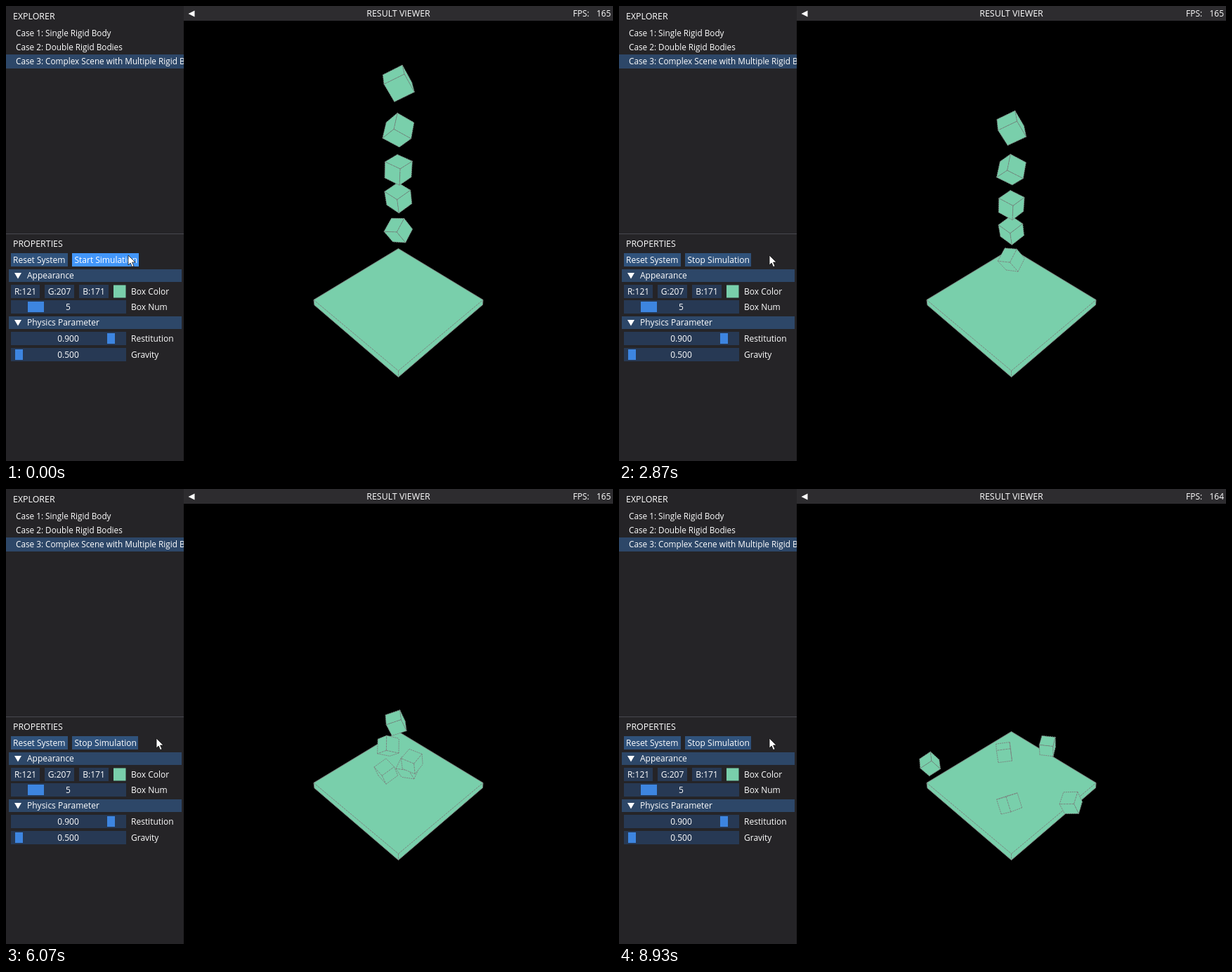
Recreate the animation shown at these times as an HTML page with a canvas. Size 864 px wide and 648 px high, loop 9000 ms.

```html
<!DOCTYPE html>
<html lang="en">
<head>
<meta charset="utf-8">
<title>Rigid body viewer</title>
<style>
  html, body { margin: 0; width: 100%; height: 100%; overflow: hidden; background: #000; }
  canvas { display: block; }
</style>
</head>
<body>
<canvas id="stage" width="864" height="648"></canvas>
<script>
const ctx = document.getElementById('stage').getContext('2d');
const GREEN = '#79cfab', EDGE = '#7b8681', HEADER = '#2d4768', BUTTON = '#30527b', HOVER = '#4296fa';
const FRAME = '#273954', GRAB = '#3d85e0', PANEL = '#252427', BAR = '#2d2c2f';

// Seconds: release, first collisions, a moment of the scatter, end of the motion.
const START = 0.1, HIT = 4.87, SCATTER = 6.07, END = 8.93, LOOP = 9;
// Pixels: camera distance, cube side at floor scale, axis of the falling stack.
const CAMERA = 568, SIDE = 20.7, AXIS_X = 558.5, FLOOR_Y = 419;
const GRAVITY = 4.49, FORESHORTEN = 0.0013;

const clamp = (v, a = 0, b = 1) => Math.min(b, Math.max(a, v));
const lerp = (a, b, u) => a + (b - a) * u;
const smooth = u => u * u * (3 - 2 * u);
const dot = (a, b) => a[0] * b[0] + a[1] * b[1] + a[2] * b[2];
const unit = a => a.map(v => v / Math.sqrt(dot(a, a)));
const cross = (a, b) => [0, 1, 2].map(i => a[(i + 1) % 3] * b[(i + 2) % 3] - a[(i + 2) % 3] * b[(i + 1) % 3]);
const transpose = m => [0, 1, 2].map(i => m.map(row => row[i]));

// Orthonormal frame from two rough directions; both share the correction.
function frame(a, b) {
  for (let i = 0; i < 3; i++) {
    a = unit(a);
    b = unit(b);
    const d = dot(a, b) / 2;
    [a, b] = [a.map((v, j) => v - d * b[j]), b.map((v, j) => v - d * a[j])];
  }
  a = unit(a);
  b = unit(b);
  return [a, b, cross(a, b)];
}

// Orientation from two screen edges at the nearest corner of a cube.
function fromEdges([ax, ay, bx, by], size) {
  const deepen = (x, y) => [x, y, Math.sqrt(Math.max(0, size * size - x * x - y * y))];
  return transpose(frame(deepen(ax, ay), deepen(bx, by)));
}

// The equivalent cube orientation that needs the least turning.
function nearest(prev, rot) {
  let best = rot, score = -9;
  for (let i = 0; i < 3; i++) {
    for (let bits = 0; bits < 8; bits++) {
      const cols = transpose(rot);
      const j = (i + 1 + (bits & 1)) % 3;
      const a = cols[i].map(v => bits & 2 ? -v : v);
      const b = cols[j].map(v => bits & 4 ? -v : v);
      const m = transpose([a, b, cross(a, b)]);
      const s = m.reduce((sum, row, n) => sum + dot(row, prev[n]), 0);
      if (s > score) { score = s; best = m; }
    }
  }
  return best;
}

function tilt(rot, angle) {
  const c = Math.cos(angle), s = Math.sin(angle);
  const y = rot[1].map((v, i) => v * c - rot[2][i] * s);
  return frame(rot[0], y);
}

const fallScale = y => 1 + (FLOOR_Y - y) * 0.0017;
const floorScale = y => 1 + (y - 408) * 0.0015;

// Free fall seen from above; a cube stops on those already stacked below it.
function fallY(startY, level, t) {
  const rise = FLOOR_Y - startY;
  const h = rise / (1 + FORESHORTEN * rise) - GRAVITY * Math.max(0, t - START) ** 2;
  const seen = h / (1 - FORESHORTEN * h);
  return FLOOR_Y - Math.max(seen, 11 + 19 * level);
}

// Parabola through the collision, a scatter point and an end point.
function arc(p0, p1, p2, t) {
  const s1 = (p1 - p0) / (SCATTER - HIT), s2 = (p2 - p1) / (END - SCATTER);
  return p0 + (t - HIT) * (s1 + (t - SCATTER) * (s2 - s1) / (END - HIT));
}

// From the bottom of the stack upwards.
const cubes = [
  { y: 319.5, pose: [-18, -1, 10, -19], mid: [572, 397], end: [610, 366], endPose: [-19, -1, -1, 14] },
  { y: 273, pose: [-18, -11, 19, -13], mid: [541, 402], end: [442.5, 391.5], endPose: [13, 11, -16, 10] },
  { y: 233, pose: [-21, -10, 17, -11], mid: [578, 388], end: [643.5, 447], endPose: [-20, 0, 5, -17] },
  { y: 177, pose: [6, -22, 24, 12], mid: [544, 366], end: [555.5, 448], endPose: [-15, 4, 17, -6] },
  { y: 110, pose: [-28, 14, 14, 25], mid: [555, 333], end: [548, 375], endPose: [-20, 2, 3, 17] }
];
cubes.forEach((c, level) => {
  c.fall = t => fallY(c.y, level, t);
  c.rot = fromEdges(c.pose, SIDE * fallScale(c.y));
  c.hitY = c.fall(HIT);
  c.hitRot = tilt(c.rot, (c.hitY - c.y) / CAMERA);
  c.endRot = nearest(c.hitRot, fromEdges(c.endPose, SIDE * floorScale(c.end[1])));
});

function stateAt(c, t) {
  if (t < HIT) {
    const y = c.fall(t);
    return { x: AXIS_X, y, scale: fallScale(y), rot: tilt(c.rot, (y - c.y) / CAMERA) };
  }
  t = Math.min(t, END);
  const u = (t - HIT) / (END - HIT);
  const row = n => c.hitRot[n].map((v, i) => lerp(v, c.endRot[n][i], u));
  const y = arc(c.hitY, c.mid[1], c.end[1], t);
  return {
    x: arc(AXIS_X, c.mid[0], c.end[0], t), y,
    scale: lerp(fallScale(y), floorScale(y), u),
    rot: frame(row(0), row(1))
  };
}

function polygon(points, fill) {
  ctx.beginPath();
  points.forEach(p => ctx.lineTo(p[0], p[1]));
  ctx.closePath();
  ctx.fillStyle = fill;
  ctx.fill();
}

function lines(pairs, dash) {
  ctx.beginPath();
  for (const [a, b] of pairs) {
    ctx.moveTo(a[0], a[1]);
    ctx.lineTo(b[0], b[1]);
  }
  ctx.strokeStyle = EDGE;
  ctx.lineWidth = 1;
  ctx.setLineDash(dash);
  ctx.stroke();
  ctx.setLineDash([]);
}

function drawCube({ x, y, scale, rot }) {
  const size = SIDE * scale;
  const corner = (axis, ...signs) => {
    const h = [];
    signs.forEach((s, n) => { h[(axis + n) % 3] = s / 2; });
    const q = size / (1 + dot(rot[2], h) * size / CAMERA);
    return [x + dot(rot[0], h) * q, y + dot(rot[1], h) * q];
  };
  const facing = (axis, sign) => rot[2][axis % 3] * sign < 0;
  const inner = [], outline = [];
  for (let i = 0; i < 3; i++) {
    for (const s of [-1, 1]) {
      if (facing(i, s)) {
        polygon([corner(i, s, -1, -1), corner(i, s, 1, -1), corner(i, s, 1, 1), corner(i, s, -1, 1)], GREEN);
      }
      for (const r of [-1, 1]) {
        const seen = facing(i + 1, s) + facing(i + 2, r);
        if (seen) (seen === 2 ? inner : outline).push([corner(i, -1, s, r), corner(i, 1, s, r)]);
      }
    }
  }
  lines(outline, [2, 1]);
  lines(inner, [3, 1]);
}

function drawFloor() {
  const back = [558.5, 345.5], left = [438, 418.5], right = [679, 418.5], front = [558.5, 519.5];
  const low = [558.5, 528.5], lowLeft = [439, 426], lowRight = [678.5, 425.5];
  polygon([back, right, lowRight, low, lowLeft, left], GREEN);
  lines([[left, back], [back, right], [right, lowRight], [lowRight, low], [low, lowLeft], [lowLeft, left]], []);
  lines([[left, front], [front, right], [front, low]], [3, 1]);
}

function text(s, x, y, align = 'left', size = 12) {
  ctx.font = size + 'px "Open Sans", "Noto Sans", sans-serif';
  ctx.textAlign = align;
  ctx.fillStyle = '#fff';
  ctx.fillText(s, x, y);
}

function box(x, y, w, h, color) {
  ctx.fillStyle = color;
  ctx.fillRect(x, y, w, h);
}

function field(s, x, y, w) {
  box(x, y, w, 19, FRAME);
  text(s, x + w / 2, y + 14, 'center');
}

function slider(y, value, grabX, grabW, label) {
  box(7, y, 164, 19, FRAME);
  box(grabX, y + 2, grabW, 15, GRAB);
  text(value, 88.5, y + 14, 'center');
  text(label, 178, y + 14);
}

function section(y, label) {
  box(4, y, 246, 18, HEADER);
  polygon([[12, y + 5], [22, y + 5], [17, y + 13.5]], '#fff');
  text(label, 30, y + 13);
}

function drawExplorer() {
  const cases = ['Single Rigid Body', 'Double Rigid Bodies', 'Complex Scene with Multiple Rigid Bodies'];
  ctx.save();
  ctx.beginPath();
  ctx.rect(0, 0, 253, 648);
  ctx.clip();
  box(0, 0, 253, 648, PANEL);
  text('EXPLORER', 10, 19, 'left', 12.4);
  box(0, 69, 253, 20, HEADER);
  cases.forEach((name, i) => text(`Case ${i + 1}: ${name}`, 14, 43 + 20 * i, 'left', 11.75));
  ctx.restore();
}

function drawProperties(t, cursorX) {
  const running = t >= START;
  box(0, 324, 253, 1, '#48484f');
  text('PROPERTIES', 10, 343, 'left', 12.4);
  box(7, 352, 81, 19, BUTTON);
  text('Reset System', 10, 366);
  box(94, 352, running ? 94 : 95, 19, cursorX < 188 ? HOVER : BUTTON);
  text(running ? 'Stop Simulation' : 'Start Simulation', 97.5, 366);

  section(375, 'Appearance');
  field('R:121', 7, 397, 41);
  field('G:207', 55, 397, 42);
  field('B:171', 104, 397, 42);
  box(153, 397.5, 17.5, 18, GREEN);
  text('Box Color', 178, 411);
  slider(419, '5', 31, 23, 'Box Num');
  section(442, 'Physics Parameter');
  slider(464, '0.900', 144, 11, 'Restitution');
  slider(487, '0.500', 13, 11, 'Gravity');
}

function drawBar(t) {
  box(253, 0, 611, 21, BAR);
  polygon([[259.5, 11], [268.5, 6.5], [268.5, 15.5]], '#fff');
  text('RESULT VIEWER', 558.5, 15, 'center', 12.4);
  const dip = (t >= 3.2 && t < 4.2) || t >= 8.6;
  text('FPS:', 807, 15);
  text(dip ? '164' : '165', 861, 15, 'right');
}

function drawCursor(x, y) {
  const shape = [[0, 0], [0, 14], [3.2, 11], [5.6, 16.5], [8, 15.5], [5.6, 10], [10, 10]];
  polygon(shape.map(p => [x + p[0], y + p[1]]), '#fff');
  ctx.strokeStyle = '#111';
  ctx.lineWidth = 0.8;
  ctx.stroke();
}

function draw(t) {
  box(0, 0, 864, 648, '#000');
  drawFloor();
  cubes.map(c => stateAt(c, t)).sort((a, b) => a.scale - b.scale).forEach(drawCube);
  drawBar(t);
  const cursorX = lerp(174, 214, smooth(clamp((t - 0.5) / 0.5)));
  drawExplorer();
  drawProperties(t, cursorX);
  drawCursor(cursorX, 355);
}

const begin = performance.now();
function tick() {
  draw((performance.now() - begin) / 1000 % LOOP);
  requestAnimationFrame(tick);
}
tick();
</script>
</body>
</html>
```
